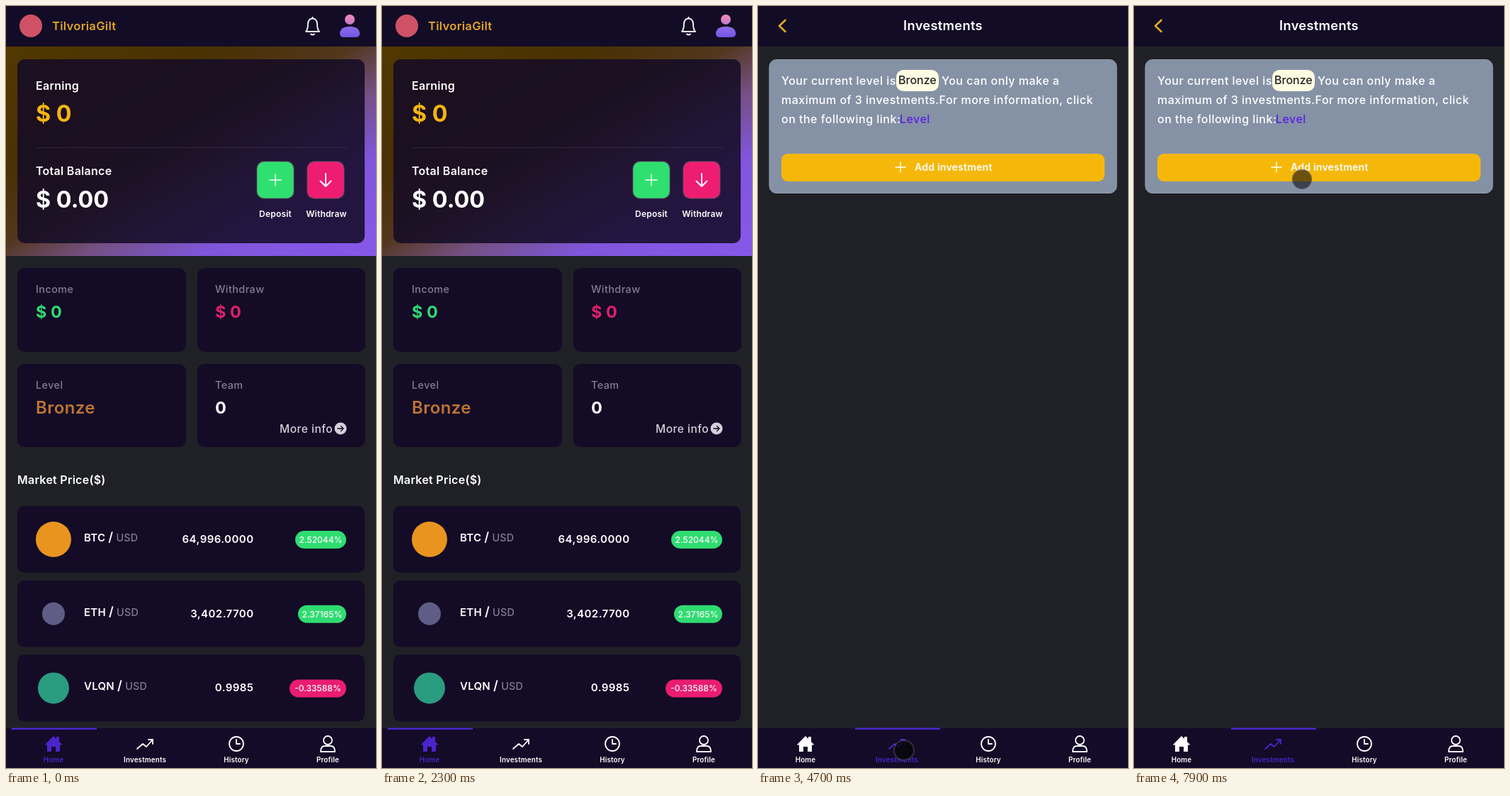
Write an HTML page that moves like this. It is 522x1073 px and loops after 8 s.

```html
<!DOCTYPE html>
<html lang="en">
<head>
<meta charset="utf-8">
<title>Wallet app</title>
<style>
  html, body { margin: 0; height: 100%; overflow: hidden; background: #202126; }
  svg { display: block; width: 100vw; height: 100vh; }
  text { font: 600 16px Inter, "Open Sans", sans-serif; letter-spacing: .017em; fill: #fff; }
  .card { fill: #140b26; }
  .big { font-size: 32.3px; font-weight: 700; letter-spacing: 0; }
  .mid { font-size: 23.5px; font-weight: 700; letter-spacing: 0; }
  .label { font-size: 14.4px; font-weight: 450; letter-spacing: .03em; fill: #827d93; }
  .coin { font-size: 15px; }
  .price { font-size: 15px; letter-spacing: .03em; text-anchor: end; }
  .pill { font-size: 12px; font-weight: 450; letter-spacing: 0; text-anchor: middle; }
  .small { font-size: 12px; text-anchor: middle; }
  .info { font-weight: 450; letter-spacing: .03em; }
  .button { stroke: #6a5468; stroke-opacity: .55; stroke-width: 1.5; }
  .line { fill: none; stroke: currentColor; stroke-width: 1.8; stroke-linecap: round; stroke-linejoin: round; }
  .tab { color: #fff; }
  .tab text { font-size: 9.8px; text-anchor: middle; fill: currentColor; }
  .tab rect { display: none; }
  .tab.active { color: #4c24cc; }
  .tab.active rect { display: inline; }
</style>
</head>
<body>
<svg viewBox="0 0 522 1073" preserveAspectRatio="none" color="#fff">
  <defs>
    <linearGradient id="hero" x2="1" y2="1">
      <stop stop-color="#523800"/>
      <stop offset=".3" stop-color="#493104"/>
      <stop offset=".47" stop-color="#52371c"/>
      <stop offset=".6" stop-color="#745082"/>
      <stop offset=".76" stop-color="#7f56dc"/>
      <stop offset="1" stop-color="#8658ea"/>
    </linearGradient>
    <linearGradient id="avatar" gradientUnits="userSpaceOnUse" x1="485" y1="12" x2="485" y2="44">
      <stop stop-color="#f58bb0"/>
      <stop offset=".45" stop-color="#c07ad0"/>
      <stop offset=".6" stop-color="#8a68ea"/>
      <stop offset="1" stop-color="#7257e4"/>
    </linearGradient>
  </defs>
  <rect width="522" height="1073" fill="#202126"/>
  <rect width="522" height="57" fill="#130c26"/>

  <g id="home">
    <circle cx="35" cy="28" r="16" fill="#cf5266"/>
    <text x="65" y="34" style="fill:#e0a526;font-size:16.600px">TilvoriaGilt</text>
    <path class="line" d="M423 36q3-3 3-11a6.500 7.500 0 0 1 13 0q0 8 3 11zM430 39.500q2.500 2 5 0M432.500 17v-1"/>
    <circle cx="485" cy="19" r="7" fill="url(#avatar)"/>
    <path d="M471 39q0-10 14-10t14 10q0 5-6 5h-16q-6 0-6-5z" fill="url(#avatar)"/>

    <rect y="57" width="522" height="295" fill="url(#hero)"/>
    <rect x="16" y="75" width="490" height="259" rx="10" fill="#140b26" opacity=".86"/>
    <text x="42" y="118">Earning</text>
    <text class="big" x="42" y="163" style="fill:#f5b512">$ 0</text>
    <path d="M42 199.500H481" stroke="#32273f"/>
    <text x="42" y="238">Total Balance</text>
    <text class="big" x="42" y="284" id="balance"></text>
    <rect class="button" x="354" y="219" width="52" height="52" rx="10" fill="#2fe070"/>
    <path class="line" d="M372 245h16M380 237v16" style="stroke-width:1.400"/>
    <text class="small" x="380" y="297">Deposit</text>
    <rect class="button" x="425" y="219" width="52" height="52" rx="10" fill="#ee1d72"/>
    <path class="line" d="M451 236v18M443.500 246.500l7.500 7.500 7.500-7.500" style="stroke-width:2"/>
    <text class="small" x="452" y="297">Withdraw</text>

    <rect class="card" x="16" y="369" width="238" height="118" rx="10"/>
    <text class="label" x="42" y="404">Income</text>
    <text class="mid" x="42" y="439" id="income" style="fill:#2edc70"></text>
    <rect class="card" x="270" y="369" width="237" height="118" rx="10"/>
    <text class="label" x="295" y="404">Withdraw</text>
    <text class="mid" x="295" y="439" style="fill:#e01f6c">$ 0</text>
    <rect class="card" x="16" y="504" width="238" height="117" rx="10"/>
    <text class="label" x="42" y="539">Level</text>
    <text x="42" y="574" style="fill:#bd7436;font-size:24px">Bronze</text>
    <rect class="card" x="270" y="504" width="237" height="117" rx="10"/>
    <text class="label" x="295" y="539">Team</text>
    <text class="mid" x="295" y="574">0</text>
    <text class="info" x="386" y="601" style="fill:#d3d0da;font-size:15.600px">More info</text>
    <circle cx="472" cy="595" r="8.500" fill="#d3d0da"/>
    <path class="line" d="M468 595h8M472.500 591.500l3.500 3.500-3.500 3.500" color="#140b26" style="stroke-width:1.400"/>
    <text x="16" y="673">Market Price($)</text>
    <g id="market"></g>
  </g>

  <g id="invest">
    <path class="line" d="M38.500 20l-8.500 8 8.500 8" color="#dfab20" style="stroke-width:2.600"/>
    <text x="261" y="34" text-anchor="middle" style="font-size:18.300px">Investments</text>
    <rect x="16" y="75.500" width="490" height="188" rx="10" fill="#8592a6" stroke="#939eaf"/>
    <rect x="195" y="90" width="60" height="30" rx="10" fill="#fefce3"/>
    <text class="info" x="33" y="111">Your current level is</text>
    <text class="info" x="198" y="110" style="fill:#222;letter-spacing:0">Bronze</text>
    <text class="info" x="259" y="111">You can only make a</text>
    <text class="info" x="33" y="138">maximum of 3 investments.For more information, click</text>
    <text class="info" x="33" y="165">on the following link:</text>
    <text class="info" x="200" y="165" style="fill:#5a20e4">Level</text>
    <rect x="33" y="208" width="456" height="39" rx="9" fill="#f5b80a"/>
    <path class="line" d="M194 227h14M201 220v14" style="stroke-width:1.500"/>
    <text x="221" y="232" style="font-size:14px">Add investment</text>
  </g>

  <rect y="1017" width="522" height="56" fill="#130b27"/>
  <g id="tabs"></g>
  <circle id="touch" r="14" fill="#08080c" fill-opacity=".8" stroke="#8a8a94" stroke-opacity=".3" stroke-width="2"/>
</svg>
<script>
const $ = id => document.getElementById(id);
const LOOP = 8000, STEP = 100, PAID = 2800, SWITCH = 4400;
const GREEN = '#2fdc70', PINK = '#ea1d70';

// name, price, change, pill width, icon colour, icon radius
const coins = [
  ['BTC', '64,996.0000', '2.52044%', 72, '#e8941f', 25],
  ['ETH', '3,402.7700', '2.37165%', 68, '#5f5d86', 16],
  ['VLQN', '0.9985', '-0.33588%', 80, '#2a9c80', 22],
];
$('market').innerHTML = coins.map(([name, price, change, w, color, r], i) => {
  const y = 751 + i * 104.7;
  return `<rect class="card" x="16" y="${y - 47}" width="490" height="94" rx="10"/>
    <circle cx="67" cy="${y}" r="${r}" fill="${color}"/>
    <text class="coin" x="110" y="${y + 3}">${name} <tspan style="font-size:18px">/</tspan>
      <tspan style="fill:#827d93;font-size:14.3px;font-weight:450">USD</tspan></text>
    <text class="price" x="349.5" y="${y + 5}">${price}</text>
    <rect x="${480 - w}" y="${y - 12}" width="${w}" height="25" rx="12.5" fill="${change[0] === '-' ? PINK : GREEN}"/>
    <text class="pill" x="${480 - w / 2}" y="${y + 5}">${change}</text>`;
}).join('');

const tabs = [
  ['Home', '<path fill="currentColor" d="M-12 1L0-11l4 4v-3h4v7l4 4-2 1-1-1v10h-6V4h-6v7h-6V1l-1 1z"/>'],
  ['Investments', '<path class="line" d="M-11 7l8-7 5 4 9-10M5-6h6V0"/>'],
  ['History', '<circle class="line" r="10"/><path class="line" d="M0-6v6h5"/>'],
  ['Profile', '<circle class="line" cy="-5" r="6"/><path class="line" d="M-10 11q0-8 6-8h8q6 0 6 8z"/>'],
];
$('tabs').innerHTML = tabs.map(([name, icon], i) =>
  `<g class="tab" transform="translate(${67 + i * 129} 1039)">
    <rect x="-59" y="-22.5" width="120" height="2.5"  fill="#4c26cc"/>${icon}<text y="25.5">${name}</text></g>`).join('');

// time, x, y, opacity of the touch marker
const path = [
  [3000, 242, 780, 0], [3100, 240, 800, 1], [3400, 230, 912, 1], [3800, 206, 1048, 1],
  [5700, 206, 1048, 1], [6400, 222, 790, 1], [6900, 227, 640, 1], [7300, 227, 640, 1],
  [7800, 237, 244, .8], [8000, 237, 244, .65],
];
function touchAt(t) {
  const i = path.findIndex(p => p[0] > t);
  if (i < 1) return path[0];
  const a = path[i - 1], b = path[i], k = (t - a[0]) / (b[0] - a[0]);
  return a.map((v, j) => v + (b[j] - v) * k);
}

function draw(now) {
  const t = Math.floor(now % LOOP / STEP) * STEP;
  const paid = t >= PAID, investing = t >= SWITCH;
  $('balance').textContent = paid ? '$ 10,000.00' : '$ 0.00';
  $('income').textContent = paid ? '$ 10,000' : '$ 0';
  $('home').style.display = investing ? 'none' : '';
  $('invest').style.display = investing ? '' : 'none';
  [...$('tabs').children].forEach((tab, i) => tab.classList.toggle('active', i === +investing));
  const [, x, y, opacity] = touchAt(t);
  $('touch').setAttribute('transform', `translate(${x} ${y})`);
  $('touch').setAttribute('opacity', opacity);
}

const start = performance.now();
function tick() {
  draw(performance.now() - start);
  requestAnimationFrame(tick);
}
tick();
</script>
</body>
</html>
```
